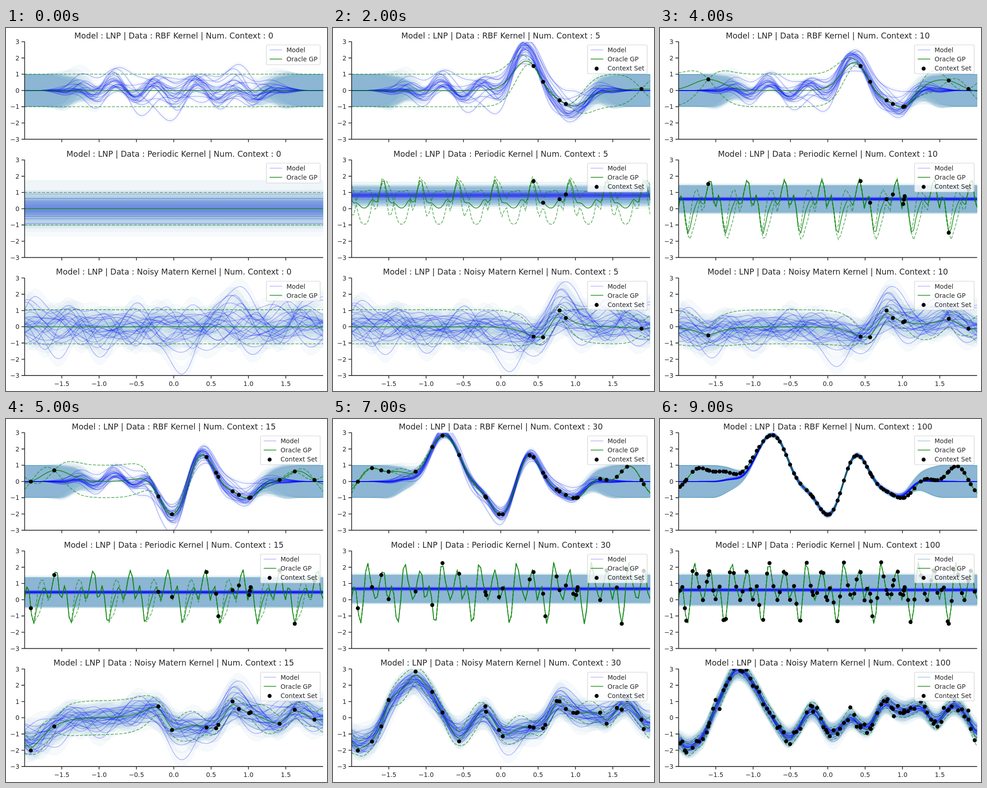
Recreate the animation shown at these times as an HTML page. Size 705 by 795 pixels, loop 10000 ms.

```html
<!DOCTYPE html>
<html lang="en">
<head>
<meta charset="utf-8">
<title>Model samples against an oracle GP</title>
<style>
html, body { margin: 0; width: 100%; height: 100%; overflow: hidden; background: #fff; }
svg { display: block; width: 705px; height: 795px; font-family: "DejaVu Sans", sans-serif; font-size: 13.75px; fill: #262626; }
.title { font-size: 17.4px; text-anchor: middle; }
.axis { fill: none; stroke: #262626; stroke-width: 1.6; }
.band { fill: #1f70a0; fill-opacity: .035; stroke: #1f70a0; stroke-opacity: .05; }
.line { fill: none; stroke: #00f; stroke-opacity: .27; stroke-width: 1.7; stroke-linejoin: round; }
.mean { fill: none; stroke: #008000; stroke-opacity: .77; stroke-width: 1.8; stroke-linejoin: round; }
.std { fill: none; stroke: #008000; stroke-opacity: .57; stroke-width: 1.8; stroke-dasharray: 6.7 2.9; }
.dot { fill: #000; }
.box { fill: #fff; fill-opacity: .8; stroke: #ccc; stroke-opacity: .9; stroke-width: 1.2; }
.late { stroke: #1f77b4; stroke-opacity: .37; }
</style>
</head>
<body>
<svg id="stage" viewBox="0 0 705 795"></svg>
<script>
const STEP_MS = 1000, SAMPLES = 20, WAVES = 14, UNIT = 35.6;
const counts = [0, 2, 5, 7, 10, 15, 20, 30, 50, 100];
const grid = Array.from({ length: 128 }, (_, i) => -2 + 4 * i / 127);
const toX = x => 368.5 + 164 * x;

// The first observations; the later ones spread evenly by the golden ratio.
const firstX = [.787, .872, .439, .567, 1.884, -1.6, 1.62, 1.01, 1.02, 1.03, -1.914, -.207, -.024, .597, 1.417];

const rbf = d => Math.exp(-d * d / .08);
const periodic = d => Math.exp(-8 * Math.sin(Math.PI * d / .5) ** 2);
const matern = d => { const r = Math.sqrt(3) * Math.abs(d) / .2; return (1 + r) * Math.exp(-r); };

// knots: key points of the hidden function behind the observations.
const panels = [
  { name: "RBF", top: 30, kernel: rbf, noise: 1e-6, fitNoise: 5e-4, jitter: 0, model: taperedModel,
    knots: [[-2,-.4], [-1.91,.01], [-1.7,.83], [-1.6,.68], [-1.4,.62], [-1.16,.54], [-.97,1.74], [-.89,2.31],
      [-.76,2.85], [-.52,1.21], [-.32,-.37], [-.207,-.92], [-.02,-2.03], [.36,1.55], [.44,1.5], [.6,.26],
      [.79,-.61], [1.02,-1], [1.29,.12], [1.42,.09], [1.62,.61], [1.73,.95], [1.88,.12], [1.975,-.58]] },
  { name: "Periodic", top: 289, kernel: periodic, noise: 1e-5, fitNoise: .002, jitter: 0, model: flatModel,
    // One period, in fractions of its length.
    knots: [[.073,.55], [.165,0], [.238,.88], [.335,1.83], [.39,1.42], [.451,.08], [.512,.28], [.567,.84],
      [.628,.38], [.671,-.65], [.732,-1.48], [.793,-.63], [.86,1.37], [.927,2.3], [.982,1.55]]
      .map(([u, y]) => [.5 * u - .247, y]) },
  { name: "Noisy Matern", top: 547.5, kernel: matern, noise: .1, fitNoise: .02, jitter: .24, model: smoothModel,
    knots: [[-2,-1.1], [-1.914,-2.08], [-1.6,-.55], [-1.47,.7], [-1.25,2.95], [-1.16,3.04], [-.97,1.87],
      [-.52,-1.3], [-.42,-.75], [-.27,.5], [-.207,.74], [-.024,-.78], [.15,-.8], [.34,.5], [.44,-.67],
      [.58,-.58], [.787,1.06], [.872,.51], [1.02,.3], [1.25,1.1], [1.417,-.41], [1.62,.51],
      [1.884,-.07], [1.975,-1.34]] }
];

function randomSource(seed) {
  const uniform = () => {
    seed = seed + 0x6D2B79F5 | 0;
    let t = Math.imul(seed ^ seed >>> 15, 1 | seed);
    t = t + Math.imul(t ^ t >>> 7, 61 | t) ^ t;
    return ((t ^ t >>> 14) >>> 0) / 4294967296;
  };
  const normal = () => Math.sqrt(-2 * Math.log(1 - uniform())) * Math.cos(2 * Math.PI * uniform());
  return { uniform, normal };
}

function ease(a, b, x) {
  const t = Math.min(1, Math.max(0, (x - a) / (b - a)));
  return t * t * (3 - 2 * t);
}

// Gaussian process regression through a Cholesky factor.
function regress(points, kernel, noise) {
  const L = [];
  points.forEach((p, i) => {
    L.push([]);
    for (let j = 0; j <= i; j++) {
      let s = kernel(p.x - points[j].x) + (i === j ? noise : 0);
      for (let k = 0; k < j; k++) s -= L[i][k] * L[j][k];
      L[i].push(i === j ? Math.sqrt(Math.max(s, 1e-9)) : s / L[j][j]);
    }
  });
  const forward = v => {
    const out = [];
    for (let i = 0; i < v.length; i++) {
      let s = v[i];
      for (let k = 0; k < i; k++) s -= L[i][k] * out[k];
      out.push(s / L[i][i]);
    }
    return out;
  };
  const w = forward(points.map(p => p.y));
  return x => {
    const v = forward(points.map(p => kernel(x - p.x)));
    const mean = v.reduce((s, e, i) => s + e * w[i], 0);
    const variance = kernel(0) + noise - v.reduce((s, e) => s + e * e, 0);
    return { mean, std: Math.sqrt(Math.max(0, variance)) };
  };
}

function prepare(panel, index) {
  const random = randomSource(41 + index * 17);
  panel.toY = v => panel.top + UNIT * (3 - v);
  const truth = regress(panel.knots.map(([x, y]) => ({ x, y })), panel.kernel, panel.fitNoise);
  panel.points = Array.from({ length: 100 }, (_, i) => {
    const early = i < firstX.length;
    const x = early ? firstX[i] : -2 + 4 * (i * .618034 % 1);
    return { x, y: truth(x).mean + (early ? 0 : panel.jitter * random.normal()) };
  });
  panel.samples = Array.from({ length: SAMPLES }, (_, i) => {
    const p = (i + .5) / SAMPLES;
    const size = (.5 + .9 * random.uniform() ** 2) * Math.sqrt(2 / WAVES);
    const waves = Array.from({ length: WAVES }, () => [5.2 * random.normal(), 2 * Math.PI * random.uniform()]);
    return {
      level: .55 * Math.log(p / (1 - p)),
      width: random.normal(),
      wiggle: x => size * waves.reduce((s, [f, phase]) => s + Math.cos(f * x + phase), 0)
    };
  });
}

// Fits near the centre and falls back to zero mean and unit width outside.
function taperedModel(panel, points, oracle) {
  const n = points.length;
  const gain = 1 + 1.2 * Math.exp(-n / 4), spread = .04 + .51 * Math.exp(-n / 30);
  const mean = grid.map((x, i) => (1 - ease(.8, 1.55, Math.abs(x)))
    * (gain * oracle[i].mean + .35 * oracle[i].std * Math.cos(2 * Math.PI * (x + .25) / .55)));
  const band = grid.map(x => .13 + .86 * ease(.95, 1.55, Math.abs(x)));
  return panel.samples.map(s => ({
    mid: grid.map((x, i) => mean[i] + spread * (1 - ease(.95, 1.8, Math.abs(x))) * s.wiggle(x)), band
  }));
}

// Only learns the overall level and deviation of the observations.
function flatModel(panel, points) {
  const n = points.length, spread = .05 + .4 * Math.exp(-n * n / 16);
  const level = points.reduce((s, p) => s + p.y, 0) / (n + .7);
  const width = Math.sqrt(points.reduce((s, p) => s + (p.y - level) ** 2, .6) / (n + 1));
  return panel.samples.map(s => ({
    mid: grid.map(() => level + spread * s.level),
    band: grid.map(() => width * (1 + .45 * spread * s.width))
  }));
}

// A smoother fit than the oracle, with a constant width.
function smoothModel(panel, points) {
  const spread = .15 + .7 * Math.exp(-points.length / 30);
  const mean = grid.map(regress(points, d => panel.kernel(.7 * d), .25)).map(o => o.mean);
  const band = grid.map(() => .48);
  return panel.samples.map(s => ({ mid: grid.map((x, i) => mean[i] + spread * s.wiggle(x)), band }));
}

const coords = (panel, values) => values.map((v, i) => toX(grid[i]).toFixed(1) + "," + panel.toY(v).toFixed(1));
const path = (cls, points, end = "") => `<path class="${cls}" d="M${points.join("L")}${end}"/>`;
const text = (x, y, value, attrs = "") => `<text x="${x}" y="${y}" ${attrs}>${value}</text>`;
const dot = (x, y) => `<circle class="dot" cx="${x.toFixed(1)}" cy="${y.toFixed(1)}" r="4.4"/>`;
const number = v => String(v).replace("-", "\u2212");

function legend(panel, step) {
  const x = step ? 559 : 572, y = panel.top + 7;
  const key = (cls, row) => `<path class="${cls}" d="M${x + 7} ${y + 11 + 20 * row}h27.5"/>`;
  const label = (value, row) => text(x + 44, y + 16 + 20 * row, value);
  const last = step === counts.length - 1;
  return `<rect class="box" x="${x}" y="${y}" width="${690 - x}" height="${step ? 63 : 43.5}" rx="3"/>`
    + key(last ? "line late" : "line", 0) + label("Model", 0)
    + key("mean", 1) + label("Oracle GP", 1)
    + (step ? dot(x + 20, y + 52) + label("Context Set", 2) : "");
}

function plot(panel, index, step) {
  const shown = panel.points.slice(0, counts[step]);
  const oracle = grid.map(regress(shown, panel.kernel, panel.noise));
  const samples = panel.model(panel, shown, oracle);
  const edge = (s, sign) => coords(panel, s.mid.map((m, i) => m + sign * s.band[i]));
  return `<g clip-path="url(#clip${index})">`
    + samples.map(s => path("band", edge(s, 1).concat(edge(s, -1).reverse()), "Z")).join("")
    + samples.map(s => path("line", coords(panel, s.mid))).join("")
    + path("mean", coords(panel, oracle.map(o => o.mean)))
    + [1, -1].map(k => path("std", coords(panel, oracle.map(o => o.mean + k * o.std)))).join("")
    + shown.map(p => dot(toX(p.x), panel.toY(p.y))).join("")
    + `</g>` + legend(panel, step)
    + text(368.5, panel.top - 7.3, `Model : LNP | Data : ${panel.name} Kernel | Num. Context : ${counts[step]}`, 'class="title"');
}

function axes(panel, index) {
  const bottom = panel.top + 6 * UNIT;
  let d = `M40.9 ${panel.top - .5}V${bottom}H696.5`, labels = "";
  for (let v = -3; v <= 3; v++) {
    const y = panel.toY(v);
    d += `M34 ${y}h7`;
    labels += text(29.6, y + 5, number(v), 'text-anchor="end"');
  }
  for (let v = -1.5; v <= 1.5; v += .5) {
    d += `M${toX(v)} ${bottom}v6.5`;
    if (index === 2) labels += text(toX(v), 784, number(v.toFixed(1)), 'text-anchor="middle"');
  }
  return `<path class="axis" d="${d}"/>` + labels;
}

panels.forEach(prepare);
const stage = document.getElementById("stage");
const eachPanel = draw => panels.map(draw).join("");
stage.innerHTML = "<defs>" + eachPanel((p, i) =>
  `<clipPath id="clip${i}"><rect x="40.5" y="${p.top}" width="656" height="${6 * UNIT}"/></clipPath>`) + "</defs>"
  + counts.map((_, step) => `<g class="step" display="none">${eachPanel((p, i) => plot(p, i, step))}</g>`).join("")
  + eachPanel(axes);

const steps = [...stage.querySelectorAll(".step")];
let current = -1;
function show(now) {
  const step = Math.floor(now / STEP_MS) % steps.length;
  if (step === current) return;
  steps.forEach((g, i) => g.setAttribute("display", i === step ? "inline" : "none"));
  current = step;
}
function tick() {
  show(performance.now());
  requestAnimationFrame(tick);
}
show(0);
requestAnimationFrame(tick);
</script>
</body>
</html>
```
